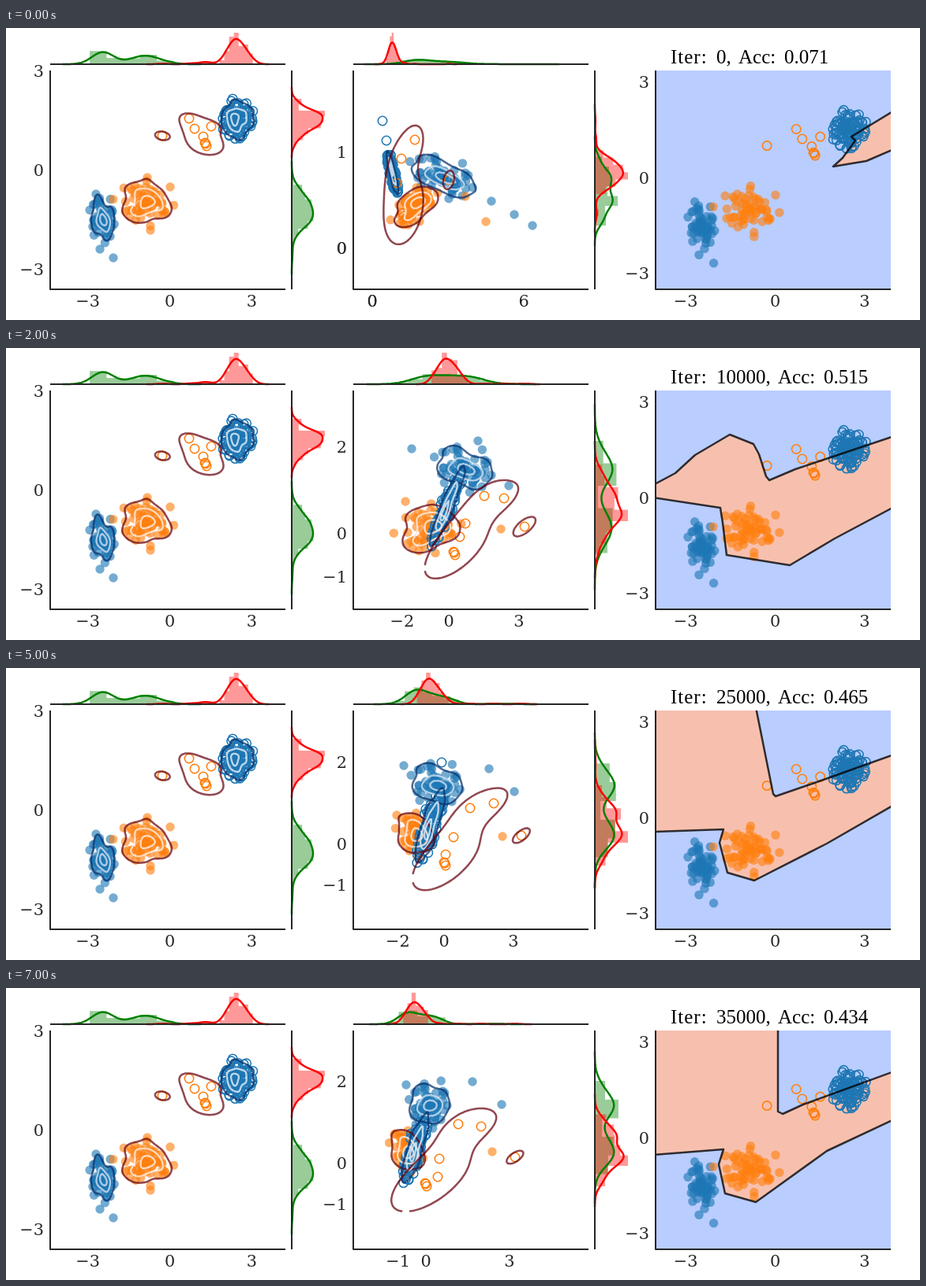
Recreate the animation shown at these times as an HTML page. Size 1158 px wide and 371 px high, loop 8 s.

```html
<!DOCTYPE html>
<html lang="en">
<head>
<meta charset="utf-8">
<title>Training progress</title>
<style>
html, body { margin: 0; width: 100%; height: 100%; overflow: hidden; background: #fff; }
svg { display: block; }
text { font: 20.8px "DejaVu Serif", serif; fill: #262626; }
.title { font: 25px "Liberation Serif", serif; fill: #000; }
</style>
</head>
<body>
<svg id="stage" width="1158" height="371" viewBox="0 0 1158 371">
  <clipPath id="field"><rect x="823" y="54" width="298" height="278"/></clipPath>
</svg>
<script>
const BLUE = '#1f77b4', ORANGE = '#ff7f0e', NAVY = '#08306b', MAROON = '#67000d';
const STEP = 1000;

// Seeded normal noise, cut off so that stray dots can be placed by hand
let seed = 11;
const rand = () => (seed = (seed * 16807) % 2147483647) / 2147483647;
const normal = () => Math.sqrt(-2 * Math.log(rand())) * Math.cos(2 * Math.PI * rand());
function noise(count) {
  const out = [];
  while (out.length < count) {
    const p = [normal(), normal()];
    if (Math.hypot(...p) < 2.2) out.push(p);
  }
  return out;
}
const bases = [noise(58), noise(58), noise(95)];

const pairs = a => Array.from({ length: a.length / 2 }, (_, i) => [a[2 * i], a[2 * i + 1]]);
const mix = (a, b) => Array.isArray(a) ? a.map((v, i) => mix(v, b[i])) : (a + b) / 2;
const mean = a => a.reduce((s, v) => s + v, 0) / a.length;
const num = v => +v.toFixed(1);
const line = pts => 'M' + pts.map(p => p.map(num)).join('L');
const path = (d, attrs) => `<path d="${d}" ${attrs}/>`;
const stroke = (color, width, alpha = 1) =>
  `fill="none" stroke="${color}" stroke-width="${width}" stroke-opacity="${alpha}" stroke-linejoin="round"`;
const text = (s, x, y, anchor = 'middle') =>
  `<text x="${num(x)}" y="${num(y)}" text-anchor="${anchor}">${String(s).replace('-', '\u2212')}</text>`;

// Clouds: [mean x, mean y, spread x, spread y, correlation]
function makeGroups(clouds, strays, few) {
  const groups = clouds.map(([mx, my, sx, sy, r], k) => bases[k]
    .map(([u, v]) => [mx + sx * u, my + sy * (r * u + Math.sqrt(1 - r * r) * v)])
    .concat(pairs(strays[k] || [])));
  const rest = pairs(few), [x, y] = rest[rest.length - 1];
  return [...groups, [...rest, [x + 1, y + 3], [x - 1, y - 1]]];
}
const dots = (pts, attrs) => `<g ${attrs}>` +
  pts.map(([x, y]) => `<circle cx="${num(x)}" cy="${num(y)}" r="5.7"/>`).join('') + '</g>';
const discs = (pts, color) => dots(pts, `fill="${color}" fill-opacity=".62"`);
const rings = (pts, color) => dots(pts, stroke(color, 1.6));
const scatter = ([blue, orange, ring, few]) =>
  discs(blue, BLUE) + discs(orange, ORANGE) + rings(ring, BLUE) + rings(few, ORANGE);

// Kernel density with the full covariance, drawn as level lines
function density(pts, dark, light) {
  const N = 56, n = pts.length, shrink = n ** (-1 / 3);
  const axis = k => pts.map(p => p[k]);
  const [mx, my] = [mean(axis(0)), mean(axis(1))];
  const cov = (f, g) => shrink * mean(pts.map(p => f(p) * g(p)));
  const dx = p => p[0] - mx, dy = p => p[1] - my;
  const a = cov(dx, dx), b = cov(dx, dy), c = cov(dy, dy), det = a * c - b * b;
  const range = k => {
    const lo = Math.min(...axis(k)), hi = Math.max(...axis(k)), pad = (hi - lo) * .4;
    return [lo - pad, (hi - lo + 2 * pad) / N];
  };
  const [x0, w] = range(0), [y0, h] = range(1);
  const grid = [];
  let peak = 0;
  for (let i = 0; i <= N; i++) for (let j = 0; j <= N; j++) {
    const x = x0 + i * w, y = y0 + j * h;
    let sum = 0;
    for (const [px, py] of pts) {
      const u = x - px, v = y - py;
      sum += Math.exp(-(c * u * u - 2 * b * u * v + a * v * v) / (2 * det));
    }
    grid.push([x, y, sum]);
    peak = Math.max(peak, sum);
  }
  function level(f) {
    const z = f * peak;
    let d = '';
    const triangle = t => {
      const cut = [];
      t.forEach((p, i) => {
        const q = t[(i + 1) % 3];
        if (p[2] < z !== q[2] < z) {
          const s = (z - p[2]) / (q[2] - p[2]);
          cut.push([p[0] + s * (q[0] - p[0]), p[1] + s * (q[1] - p[1])]);
        }
      });
      if (cut.length) d += line(cut);
    };
    for (let i = 0; i < N; i++) for (let j = 0; j < N; j++) {
      const k = i * (N + 1) + j, [p, q, r, s] = [k, k + 1, k + N + 1, k + N + 2].map(m => grid[m]);
      triangle([p, q, r]);
      triangle([q, r, s]);
    }
    return d;
  }
  const cap = ' stroke-linecap="round"';
  return (light ? path(level(.85) + level(.55), stroke(light, 2.3, .85) + cap) : '') +
    path(level(.22), stroke(dark, 2.5, .72) + cap);
}
const densities = ([blue, orange, ring, few]) =>
  density(blue, NAVY, '#c6dbef') + density(orange, MAROON, '#fee8dc') +
  density(ring, NAVY, '#dbe9f6') + density(few, MAROON);

// Margins: histogram and density along one axis
const above = (t, v) => [t, 46 - v];
const beside = x => (t, v) => [x + v, t];
function histogram(vals) {
  const s = [...vals].sort((a, b) => a - b), n = s.length, lo = s[0], span = s[n - 1] - lo;
  const iqr = s[Math.floor(n * .75)] - s[Math.floor(n * .25)];
  const count = Math.ceil(span / (2 * iqr / Math.cbrt(n))), w = span / count;
  const tally = Array(count).fill(0);
  s.forEach(v => tally[Math.min(count - 1, Math.floor((v - lo) / w))]++);
  const pts = tally.flatMap((c, i) => [0, 1].map(e => [lo + (i + e) * w, c / n / w]));
  return [[lo, 0], ...pts, [lo + span, 0]];
}
function curve(vals) {
  const m = mean(vals), n = vals.length;
  const bw = Math.sqrt(mean(vals.map(v => (v - m) ** 2))) * n ** -.2;
  const lo = Math.min(...vals) - 3 * bw, step = (Math.max(...vals) + 3 * bw - lo) / 150;
  return Array.from({ length: 151 }, (_, i) => {
    const t = lo + i * step;
    return [t, mean(vals.map(v => Math.exp(-(((t - v) / bw) ** 2) / 2))) / bw / Math.sqrt(2 * Math.PI)];
  });
}
function margin(place, groups, k, height) {
  const sets = [[0, 1], [2, 3]].map(ids => ids.flatMap(i => groups[i].map(p => p[k])));
  const bars = sets.map(histogram), curves = sets.map(curve);
  const scale = height / Math.max(...[...bars, ...curves].flat().map(p => p[1]));
  const put = pts => line(pts.map(([t, v]) => place(t, v * scale)));
  const colors = ['green', 'red'];
  return bars.map((b, i) => path(put(b) + 'Z', `fill="${colors[i]}" fill-opacity=".4"`)).join('') +
    curves.map((c, i) => path(put(c), stroke(colors[i], 2.5))).join('');
}

// Axes: labels at zero and at the rounded ends of the data
const spines = (x, sides) => path(
  `M${x} 54V332H${x + 298}` + (sides ? `M${x} 46h298M${x + 306} 54v278` : ''), stroke('#262626', 2));
const whole = v => Math.sign(v) * Math.floor(Math.abs(v) + .55) || 0;
function ticks(left, [x0, sx, y0, sy], [xMin, xMax, yMin, yMax] = [-3, 3, -3, 3]) {
  return [xMin, 0, xMax].map(v => text(v, x0 + v * sx, 354)).join('') +
    [yMin, 0, yMax].map(v => text(v, left - 8, y0 - v * sy + 7.5, 'end')).join('');
}
function limits(groups, [x0, sx, y0, sy]) {
  const xs = groups.flat().map(p => (p[0] - x0) / sx), ys = groups.flat().map(p => (y0 - p[1]) / sy);
  return [Math.min(...xs), Math.max(...xs), Math.min(...ys), Math.max(...ys)].map(whole);
}
function title(iter, acc) {
  const x = 915.5 + 12.5 * String(iter).length;
  const word = (s, at, gap = 0) => `<text class="title" x="${at}" y="45" letter-spacing="${gap}">${s}</text>`;
  return word('Iter:', 842, 1) + word(iter + ',', 900) + word('Acc:', x) + word(acc.toFixed(3), x + 58);
}
const panel = (left, groups, axes, lims) => scatter(groups) + densities(groups) +
  margin(above, groups, 0, 40) + margin(beside(left + 306), groups, 1, 42) +
  spines(left, true) + ticks(left, axes, lims);

// Fixed data
const data = makeGroups(
  [[123, 245, 9, 15, 0], [174, 222, 18, 14, .1], [294, 117, 11, 13, 0]],
  [[114, 211, 119, 281, 136, 292], [179, 190, 208, 202, 183, 257]],
  [198, 137, 232, 115, 239, 128, 250, 138, 260, 125, 253, 147]);
const fieldData = data.map(g => g.map(([x, y]) => [974.5 + (x - 207.5) * 1.09, 191 + (y - 180) * .962]));

// Each state: accuracy, axes, clouds, strays, few rings, boundary lines
const start0 = [.071, [464, 32, 279, 122],
  [[555, 191, 23, 14, .35], [517, 227, 14, 14, -.6], [490, 186, 4, 15, .85]],
  [[667, 251, 644, 237, 615, 220], [608, 246, 582, 214], [477, 118, 482, 143]],
  [518, 142, 561, 193, 501, 166, 495, 197, 507, 220, 503, 236],
  [[1125, 105, 1071, 138, 1076, 143, 1060, 165, 1048, 176, 1090, 169, 1125, 154]]];

const start1 = [.131, [538, 40, 203, 56.5],
  [[608, 137, 22, 13, -.35], [543, 214, 19, 16, -.25], [540, 203, 9, 20, -.6]],
  [[671, 147, 589, 116, 634, 110], [637, 190, 640, 174], [545, 156, 575, 148]],
  [653, 182, 618, 154, 589, 178, 575, 208, 564, 233, 558, 243],
  [[1125, 86, 1000, 147, 940, 186, 918, 198, 909, 211, 907, 225, 912, 250, 911, 271, 940, 276, 1008, 272, 1060, 239, 1125, 204]]];

const start2 = [.515, [561, 29.6, 235, 55],
  [[582, 155, 21, 15, .1], [534, 230, 20, 16, -.2], [560, 200, 12, 27, -.92]],
  [[514, 128, 598, 118, 637, 175], [506, 195, 627, 230]],
  [657, 227, 631, 191, 606, 188, 582, 223, 575, 240, 568, 260],
  [[820, 174, 848, 159, 873, 136, 917, 110, 947, 122, 954, 135, 963, 163, 967, 168, 1000, 154, 1125, 112],
   [820, 190, 905, 203, 908, 222, 913, 263, 993, 276, 1050, 242, 1125, 202]]];

const start3 = [.374, [549, 25.5, 213, 51],
  [[566, 148, 18, 13, -.1], [518, 220, 14, 15, 0], [553, 200, 15, 24, -.94]],
  [[506, 144, 576, 114, 626, 160], [498, 187, 614, 210], [609, 125]],
  [651, 200, 631, 164, 594, 182, 571, 217, 565, 232, 554, 250],
  [[820, 127, 878, 116, 960, 160, 963, 167, 1000, 151, 1125, 108],
   [820, 199, 908, 205, 908, 222, 916, 264, 978, 274, 1040, 225, 1125, 162]]];

const start5 = [.465, [555, 29.3, 223, 52],
  [[547, 150, 18, 15, 0], [517, 211, 11, 14, .2], [538, 200, 10, 25, -.78]],
  [[504, 124, 612, 128, 644, 157], [495, 187, 629, 214], [552, 120]],
  [653, 213, 618, 172, 588, 178, 567, 215, 557, 237, 556, 248],
  [[820, 40, 948, 40, 972, 160, 975, 163, 1030, 144, 1125, 110],
   [820, 208, 909, 205, 904, 222, 914, 260, 948, 270, 1040, 223, 1125, 174]]];

const start7 = [.434, [532, 35.3, 222, 52],
  [[537, 150, 14, 16, -.2], [507, 207, 10, 14, .3], [519, 204, 9, 23, -.78]],
  [[507, 123, 591, 119, 628, 148], [492, 186, 616, 208], [532, 165]],
  [645, 215, 602, 176, 573, 173, 549, 217, 547, 240, 532, 249],
  [[820, 40, 978, 40, 978, 157, 984, 160, 1010, 148, 1125, 106],
   [820, 212, 909, 205, 903, 224, 911, 261, 950, 272, 1040, 207, 1125, 167]]];

const sequence = [start0, start1, start2, start3, mix(start3, start5), start5, mix(start5, start7), start7];

function draw([acc, axes, clouds, strays, few, edges], i) {
  const groups = makeGroups(clouds, strays, few);
  const lines = edges.map(pairs);
  const area = lines.length > 1 ? lines[0].concat([...lines[1]].reverse()) : lines[0];
  return panel(440, groups, axes, limits(groups, axes)) +
    '<g clip-path="url(#field)"><rect x="823" y="54" width="298" height="278" fill="#b9cdfe"/>' +
    path(line(area) + 'Z', 'fill="#f7c0ae"') + scatter(fieldData) +
    lines.map(l => path(line(l), stroke('#000', 2.5, .78))).join('') + '</g>' +
    spines(823) + title(i * 5000, acc);
}

const stage = document.getElementById('stage');
stage.innerHTML += `<g>${panel(56, data, [207.5, 34.6, 180, 42])}${ticks(823, [974.5, 37.8, 190, 40.5])}</g>` +
  sequence.map((s, i) => `<g class="step" visibility="hidden">${draw(s, i)}</g>`).join('');
const layers = [...stage.querySelectorAll('.step')];

const begin = performance.now();
let shown = -1;
function frame() {
  const now = Math.floor((performance.now() - begin) / STEP) % layers.length;
  if (now !== shown) {
    layers.forEach((l, i) => l.setAttribute('visibility', i === now ? 'visible' : 'hidden'));
    shown = now;
  }
  requestAnimationFrame(frame);
}
frame();
</script>
</body>
</html>
```
